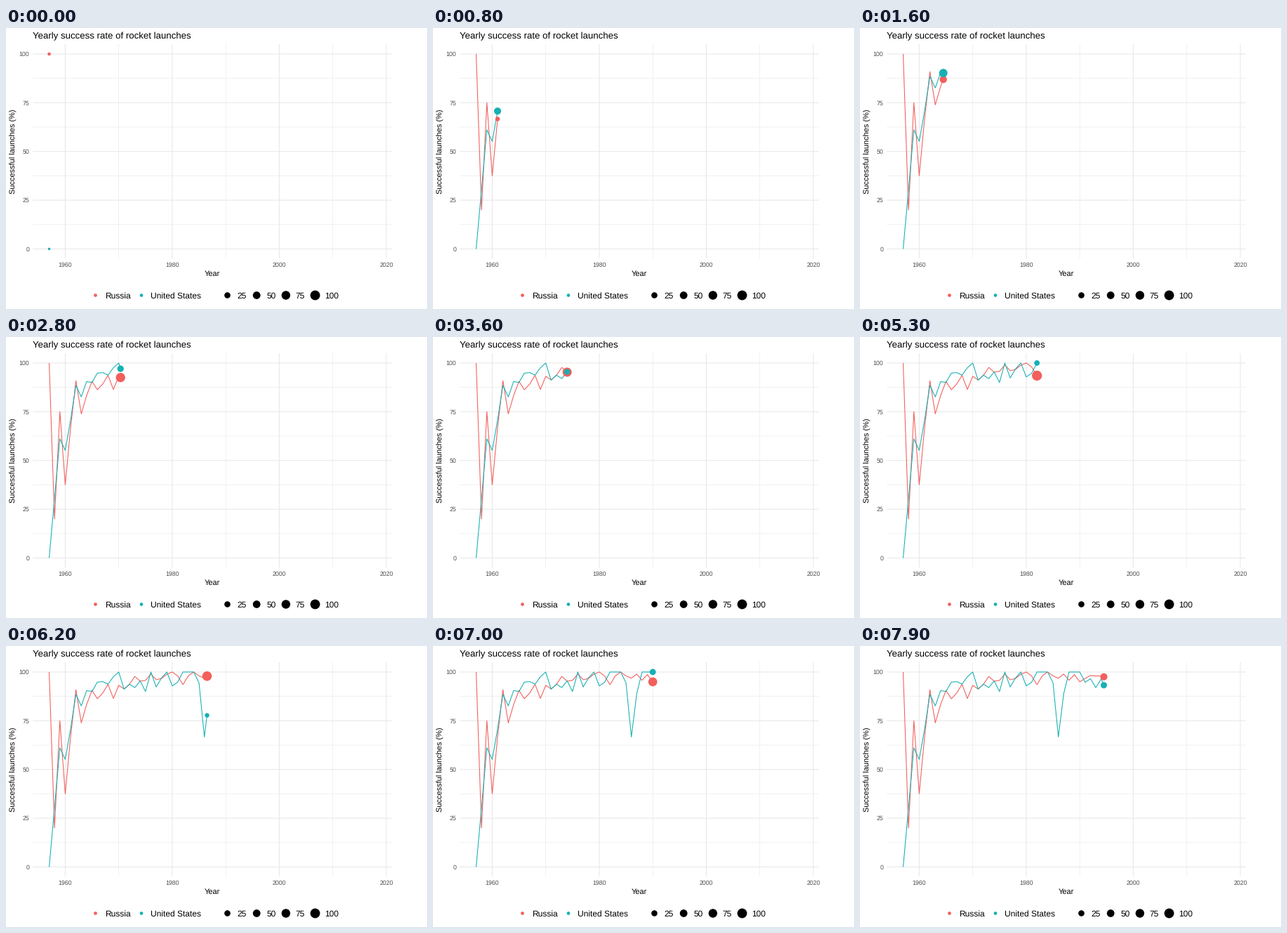
Recreate the animation shown at these times as a matplotlib script. Size 600x400 px, loop 8000 ms.

```python
import numpy as np
import matplotlib
import matplotlib.pyplot as plt
from matplotlib.animation import FuncAnimation
from matplotlib.patches import Circle

matplotlib.rcParams["font.family"] = "Liberation Sans"
matplotlib.rcParams["text.hinting"] = "none"

W, H, DPI = 600, 400, 100
PT = 72 / DPI  # points per pixel
FRAMES, INTERVAL = 80, 100
FIRST = 1957
RED, TEAL = "#f25f5c", "#17b0b4"
GRID, TICK = "#e8e8e8", "#4d4d4d"

# Launches and failures per year, from 1957 on
RUSSIA = (
    [2, 5, 4, 8, 9, 22, 23, 36, 53, 51, 74, 79, 81, 88, 92, 79, 88, 85, 93,
     100, 101, 91, 88, 89, 100, 108, 100, 97, 100, 94, 97, 94, 75, 79, 61,
     55, 49, 50, 34],
    [0, 4, 1, 5, 3, 2, 6, 6, 5, 7, 8, 5, 11, 6, 8, 5, 2, 4, 4,
     1, 4, 3, 1, 0, 2, 7, 2, 0, 2, 3, 1, 4, 1, 4, 2,
     1, 1, 1, 1],
)
USA = (
    [1, 23, 18, 29, 41, 61, 46, 63, 70, 77, 61, 48, 41, 30, 34, 32, 25, 22, 30,
     26, 26, 33, 16, 14, 19, 18, 22, 22, 18, 9, 9, 12, 18, 27, 19,
     29, 25, 28, 30],
    [1, 16, 7, 13, 12, 7, 8, 6, 7, 4, 3, 3, 1, 0, 3, 2, 2, 1, 3,
     0, 2, 1, 0, 1, 1, 0, 0, 0, 1, 3, 1, 0, 0, 0, 1,
     1, 2, 1, 3],
)


def px(year):
    return 84.4 + 7.627 * (year - 1960)


def py(rate):
    return 314.5 - 2.775 * rate


def radius(launches):
    size = 1 + 5 * np.sqrt((np.asarray(launches) - 1) / 107)
    return 1.067 * size + 0.71


fig = plt.figure(figsize=(W / DPI, H / DPI), dpi=DPI, facecolor="white")
ax = fig.add_axes([0, 0, 1, 1])
ax.set_xlim(0, W)
ax.set_ylim(H, 0)
ax.axis("off")


def text(x, y, s, size, color="black", **kw):
    ax.text(x, y, s, fontsize=size * PT, color=color, **kw)


def rule(xs, ys, width):
    ax.plot(xs, ys, color=GRID, lw=width * PT, snap=False,
            solid_capstyle="butt", zorder=1)


def dot(x, y, r, color, z=4):
    return ax.add_patch(Circle((x, y), r, fc=color, ec="none", lw=0, zorder=z))


# Grid and axis labels
for year in range(1960, 2021, 10):
    major = year % 20 == 0
    rule([px(year)] * 2, [23, 328], 1.07 if major else 0.6)
    if major:
        text(px(year), 340.2, str(year), 8.8, TICK, ha="center")
for rate in np.arange(0, 101, 12.5):
    major = rate % 25 == 0
    rule([38.2, 550], [py(rate)] * 2, 1.07 if major else 0.6)
    if major:
        text(33.4, py(rate) + 3.2, f"{rate:.0f}", 8.8, TICK, ha="right")

text(38, 15.2, "Yearly success rate of rocket launches", 13.2)
text(294, 353, "Year", 11, ha="center")
text(13.4, 175.8, "Successful launches (%)", 11, rotation=90,
     ha="right", va="center") if False else ax.text(
    13.4, 175.8, "Successful launches (%)", fontsize=11 * PT, rotation=90,
    rotation_mode="anchor", ha="center", va="baseline")

# Legend
for x, name, color in ((127.5, "Russia", RED), (193, "United States", TEAL)):
    dot(x, 380.5, 2.35, color)
    text(x + 13.4, 384.8, name, 12)
for i, n in enumerate((25, 50, 75, 100)):
    dot(315.5 + 41.7 * i, 380.5, radius(n), "black")
    text(329.4 + 41.7 * i, 384.8, str(n), 12)


class Series:
    def __init__(self, data, color, z):
        total, failed = np.array(data)
        self.xs = px(FIRST + np.arange(len(total)))
        self.ys = py(100 * (1 - failed / total))
        self.rs = radius(total)
        self.line, = ax.plot([], [], color=color, lw=1.07 * PT, zorder=z,
                             solid_joinstyle="round", solid_capstyle="butt")
        self.head = dot(self.xs[0], self.ys[0], self.rs[0], color, z + 2)

    def show(self, t):
        steps = np.arange(len(self.xs))
        x, y, r = (np.interp(t, steps, v) for v in (self.xs, self.ys, self.rs))
        n = int(t + 1e-9) + 1
        self.line.set_data(np.append(self.xs[:n], x), np.append(self.ys[:n], y))
        self.head.center = x, y
        self.head.set_radius(r)
        return self.line, self.head


series = [Series(RUSSIA, RED, 2), Series(USA, TEAL, 3)]

# Each year lands on a whole frame, so a year lasts two or three frames
years = np.arange(len(RUSSIA[0]))
year_frames = np.round(years * 129 / 61)


def update(frame):
    t = np.interp(frame, year_frames, years)
    return [artist for s in series for artist in s.show(t)]


anim = FuncAnimation(fig, update, frames=FRAMES, interval=INTERVAL,
                     repeat=True, repeat_delay=0, blit=False)
plt.show()
```
